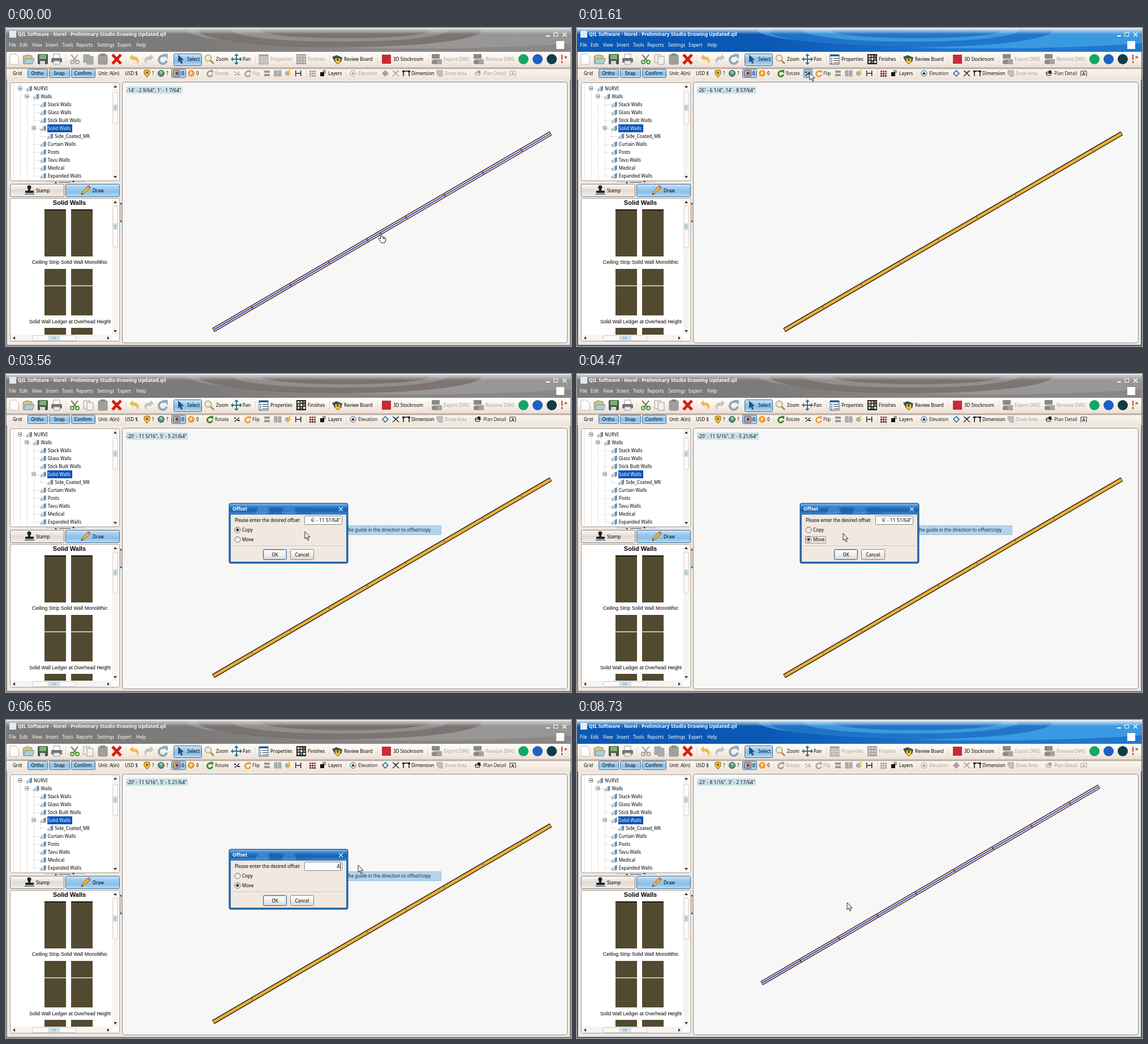
Recreate the animation shown at these times as an HTML page with a canvas. Size 998x561 px, loop 9330 ms.

```html
<!DOCTYPE html>
<html lang="en">
<head>
<meta charset="utf-8">
<title>Offset a wall</title>
<style>
html, body { margin: 0; width: 100%; height: 100%; overflow: hidden; background: #efe6de; }
canvas { display: block; }
</style>
</head>
<body>
<canvas id="stage" width="998" height="561"></canvas>
<script>
const g = document.getElementById('stage').getContext('2d');
const LOOP = 9330, GREY = '#a3a19f', UI = '"Noto Sans", sans-serif', ARIAL = '"Liberation Sans", Arial, sans-serif';

// ---------- drawing helpers ----------
function text(s, x, y, color = '#000', font = '8px ' + UI, align = 'left') {
  g.font = font; g.fillStyle = color; g.textAlign = align;
  g.fillText(s, x, y + 3);
}
function rect(x, y, w, h, fill, stroke, r = 0) {
  g.beginPath();
  g.roundRect(x, y, w, h, r);
  if (fill) { g.fillStyle = fill; g.fill(); }
  if (stroke) { g.strokeStyle = stroke; g.lineWidth = 1; g.stroke(); }
}
function gradient(x0, y0, x1, y1, colors) {
  const f = g.createLinearGradient(x0, y0, x1, y1);
  colors.forEach((c, i) => f.addColorStop(i / (colors.length - 1), c));
  return f;
}
const fade = (y0, y1, ...colors) => gradient(0, y0, 0, y1, colors);
function trace(x, y, pts) {
  g.beginPath();
  for (let i = 0; i < pts.length; i += 2) g.lineTo(x + pts[i], y + pts[i + 1]);
}
function poly(x, y, pts, fill, stroke, w = 1) {
  trace(x, y, pts); g.closePath();
  if (fill) { g.fillStyle = fill; g.fill(); }
  if (stroke) { g.strokeStyle = stroke; g.lineWidth = w; g.stroke(); }
}
function line(x, y, pts, color, w = 1) {
  trace(x, y, pts); g.strokeStyle = color; g.lineWidth = w; g.stroke();
}
function disc(x, y, r, fill, stroke, w = 1) {
  g.beginPath(); g.arc(x, y, r, 0, 7);
  if (fill) { g.fillStyle = fill; g.fill(); }
  if (stroke) { g.strokeStyle = stroke; g.lineWidth = w; g.stroke(); }
}
function turnArrow(x, y, r, color, w) {
  g.beginPath(); g.arc(x, y, r, 0.2, 5.2);
  g.strokeStyle = color; g.lineWidth = w; g.stroke();
  poly(x + r * .5, y - r * .9, [-w, -w, w * 1.3, -w, w * 1.3, w * 1.3], color);
}
function curveArrow(x, y, dir, color) {
  poly(x, y, [-9 * dir, -3, -3 * dir, -9, -3 * dir, -5, 4 * dir, -4, 8 * dir, 2, 5 * dir, 9, 4 * dir, 3, -2 * dir, 0, -2 * dir, 3], color);
}
const triangle = (x, y, dx, dy, s = 3) =>
  poly(x, y, dx ? [dx * s, 0, -dx, -s, -dx, s] : [0, dy * s, -s, -dy, s, -dy], '#333');
const separator = (x, y) => { for (let i = -7; i < 8; i += 3) rect(x, y + i, 1, 1, '#b9aea4'); };

function blueButton(x, y, w, h) {
  rect(x + .5, y + .5, w, h, fade(y, y + h, '#d3e9f9', '#9fcbee', '#8bbfe9', '#b4dcf6'), '#3f6c94', 2);
}

// ---------- motion ----------
const REST = { start: [-170 - 9 / 64, 13 + 7 / 64], toolbar: [-318.25, 176 + 57 / 64],
               side: [-251.3125, 65 + 21 / 64], end: [-284.0625, 38 + 17 / 64] };
// first change, last change, number of steps, waypoints
const MOVES = [
  [510, 1350, 15, [662, 362], [411, 79]],
  [2010, 2430, 8, [411, 79], [530, 277]],
  [3560, 4470, 15, [530, 277], [477, 307], [424, 293], [470, 281]],
  [4530, 5270, 11, [470, 281], [538, 258], [622, 256]],
  [7180, 7730, 9, [622, 256], [477, 322]],
];
const mix = (a, b, p) => a.map((v, i) => v + (b[i] - v) * p);
function progress(t, [t0, t1, n]) {
  if (t < t0) return 0;
  const p = Math.min(1, (Math.floor((t - t0) / (t1 - t0) * (n - 1) + .01) + 1) / n);
  return p * p * (3 - 2 * p);
}
function pointer(t) {
  const m = MOVES.findLast(m => t >= m[0]) || MOVES[0];
  const pts = m.slice(3), at = progress(t, m) * (pts.length - 1);
  const i = Math.min(pts.length - 2, Math.floor(at));
  return mix(pts[i], pts[i + 1], at - i);
}
function feet(v) {
  const n = Math.round(Math.abs(v) * 64), inches = Math.floor(n / 64);
  let a = n % 64, b = 64;
  while (a && a % 2 === 0) { a /= 2; b /= 2; }
  return `${v < 0 ? '-' : ''}${Math.floor(inches / 12)}' - ${inches % 12}${a ? ` ${a}/${b}` : ''}"`;
}
function position(t) {
  if (t >= 8730) return REST.end;
  return t < 2010 ? mix(REST.start, REST.toolbar, progress(t, MOVES[0]))
                  : mix(REST.toolbar, REST.side, progress(t, MOVES[1]));
}

// ---------- window ----------
function titleBar(active) {
  const [pale, left, right, glow, lens] = active
    ? ['#d5e6f4', '#0b58b4', '#1f78cd', '#4fb0ee', '#0f5fbb']
    : ['#d2d2d2', '#7d7b7a', '#8a8887', '#a3a1a0', '#69605d'];
  rect(0, 1, 998, 560, active ? '#1a66b6' : '#848281');
  rect(0, 1, 998, 42, gradient(0, 0, 998, 0, [left, left, right, right]));
  g.save();
  g.beginPath(); g.rect(0, 1, 998, 42); g.clip();
  g.globalAlpha = .6;
  const swirl = (x, y, rx, ry, color) => {
    g.beginPath(); g.ellipse(x, y, rx, ry, 0, 0, 7); g.fillStyle = color; g.fill();
  };
  swirl(720, 4, 400, 32, glow);
  swirl(590, 4, 250, 30, lens);
  swirl(590, 4, 190, 20, glow);
  swirl(600, 4, 150, 14, lens);
  g.restore();
  rect(0, 1, 998, 10, fade(1, 11, pale, pale + '80', pale + '00'));
  rect(6, 5, 12, 12, '#dfeaf2');
  text('QIL Software - Norel - Preliminary Studio Drawing Updated.qil', 21, 11, '#fff', 'bold 8.5px ' + UI);
  line(954, 14, [0, 0, 7, 0], '#fff', 2);
  rect(967.5, 8.5, 7, 6, null, '#fff');
  line(983, 8, [0, 0, 7, 7], '#fff', 1.5); line(983, 15, [0, 0, 7, -7], '#fff', 1.5);
  [['File', 5], ['Edit', 24], ['View', 46], ['Insert', 70], ['Tools', 99], ['Reports', 124],
   ['Settings', 161], ['Expert', 197], ['Help', 230]].forEach(([s, x]) => text(s, x, 30, '#fff'));
  rect(972, 23, 14, 14, '#fff');
}

function mainToolbar(on) {
  const tint = c => on ? c : GREY;
  rect(1, 42, 996, 28, fade(42, 70, '#fffdfa', '#f8f0e8', '#eaded4'));
  rect(1, 69, 996, 4, fade(69, 73, '#e4d9cf', '#a79a90', '#f6efe8'));
  poly(7, 46, [0, 0, 10, 0, 15, 5, 15, 18, 0, 18], '#fff', '#bbb');
  poly(30, 47, [0, 3, 7, 0, 16, 2, 17, 16, 1, 16], '#d9c27a', '#7d8a8c');
  poly(31, 54, [3, 0, 19, 0, 16, 9, 0, 9], '#a9d0d8', '#6f9398');
  rect(56, 46, 18, 18, '#4d5551', null, 2); rect(59, 47, 12, 8, '#79b56b'); rect(60, 58, 9, 6, '#d7d7d7');
  rect(84, 46, 11, 8, '#fff', '#999'); rect(80, 53, 19, 8, '#6d7378', null, 2); rect(84, 58, 11, 6, '#eee', '#999');
  separator(105, 55);
  const cut = tint('#3f9b35');
  line(115, 47, [0, 0, 10, 12], tint('#777'), 2); line(127, 47, [0, 0, -9, 12], tint('#777'), 2);
  disc(117, 60, 3, null, cut, 2); disc(126, 60, 3, null, cut, 2);
  for (const d of [0, 6]) rect(137 + d, 47 + d / 2, 11, 14, on ? '#f1f1ee' : '#aaa', '#999');
  rect(163, 47, 16, 17, '#a19f9b', '#8c8a87', 2); rect(167, 45, 8, 4, '#8a8885');
  line(188, 47, [0, 0, 15, 16], '#d81e12', 5); line(188, 63, [0, 0, 15, -16], '#d81e12', 5);
  separator(211, 55);
  curveArrow(227, 55, 1, '#eebb4d'); curveArrow(252, 55, -1, '#c3c3c3');
  turnArrow(277, 56, 7, '#8ba9bd', 4);
  blueButton(296, 45, 49, 21);
  poly(304, 47, [0, 0, 10, 9, 6, 10, 8, 15, 5, 16, 3, 11, 0, 14], '#24527e');
  text('Select', 320, 55);
  line(361, 57, [0, 0, 6, 6], '#b98937', 3); disc(357, 53, 5.5, '#dff0f8', '#cbb06a', 2);
  text('Zoom', 371, 55);
  line(407, 47, [0, 0, 0, 17], '#31708e', 2); line(399, 55, [0, 0, 17, 0], '#31708e', 2);
  for (const [x, y] of [[0, -1], [0, 1], [-1, 0], [1, 0]])
    poly(407 + x * 6, 55 + y * 6, [x * 4, y * 4, y * 4, x * 4, -y * 4, -x * 4], '#31708e');
  text('Pan', 418, 55);
  separator(440, 55);
  rect(447, 47, 16, 17, on ? '#fff' : '#d0cecc', tint('#245b90'));
  rect(447, 47, 16, 3, tint('#245b90'));
  for (const y of [53, 57, 61]) { rect(449, y, 2, 2, tint('#245b90')); rect(453, y, 9, 1, tint('#333')); }
  text('Properties', 467, 55, tint('#000'));
  rect(513, 46, 17, 18, tint('#222'));
  ['#fff', '#e3b440', '#d94d40', '#8fbce0', '#fff', '#5faa62', '#e9e2b8', '#6b81bf', '#fff'].forEach((c, i) =>
    rect(515 + i % 3 * 5, 48 + Math.floor(i / 3) * 5, 3.5, 3.5, on ? c : '#d0cecc'));
  text('Finishes', 533, 55, tint('#000'));
  separator(571, 55);
  poly(576, 48, [0, 3, 8, 0, 18, 4, 16, 12, 5, 12], '#34515b');
  poly(581, 53, [0, 0, 10, 0, 10, 6, 5, 11, 0, 6], '#f0c53a', '#5b4b14'); disc(586, 56, 2, '#34515b');
  text('Review Board', 597, 55);
  separator(656, 55);
  rect(664, 47, 16, 16, '#c92b35');
  text('3D Stockroom', 684, 55);
  separator(745, 55);
  for (const [x, s] of [[752, 'Export DWG'], [826, 'Remove DWG']]) {
    rect(x, 46, 14, 8, '#8b8987'); rect(x + 2, 55, 16, 9, '#a5a3a1'); rect(x, 57, 9, 6, '#8b8987');
    text(s, x + 21, 55, GREY);
  }
  disc(914, 55, 9, '#12a765'); disc(939, 55, 9, '#1f5fc4'); disc(964, 55, 9, '#123c46');
  rect(981, 47, 2, 9, '#d5382c'); rect(981, 58, 2, 4, '#d5382c');
  text('»', 986, 51, '#7a2a20', 'bold 9px ' + UI);
}

function drawToolbar(on, hover) {
  const tint = c => on ? c : GREY, ink = tint('#222');
  rect(1, 73, 996, 18, fade(73, 91, '#fbf5ef', '#eee3d9'));
  text('Grid', 12, 80);
  [['Ortho', 38, 35], ['Snap', 76, 36], ['Confirm', 115, 42]].forEach(([s, x, w]) => {
    blueButton(x, 72, w, 15); text(s, x + w / 2, 80, '#000', undefined, 'center');
  });
  text('Unit: A(in)', 163, 80); text('USD $', 210, 80);
  poly(244, 74, [0, 1, 5, 0, 10, 1, 10, 7, 5, 13, 0, 7], '#f3bd2c', '#80602a');
  disc(249, 79, 2, '#80602a');
  text('?', 258, 80);
  separator(266, 80);
  disc(274, 80, 5.5, '#4a8f92', '#355'); poly(274, 77, [-3, 0, 1, -2, 3, 2, 0, 5], '#a5cf69');
  text('?', 283, 80);
  blueButton(292, 72, 25, 15);
  rect(296, 75, 11, 10, '#f2c83c', '#3a2e88'); disc(302, 80, 3, '#6144a0');
  text('0', 310, 80);
  disc(327, 80, 6, '#f0992b'); text('P', 327, 80, '#fff', 'bold 8px ' + UI, 'center'); text('0', 336, 80);
  separator(347, 80);
  turnArrow(360, 81, 4.5, tint('#3b8b2c'), 3); text('Rotate', 369, 80, ink);
  if (hover) rect(400.5, 72.5, 15, 15, hover > 1 ? '#98c7ea' : '#cfe6f6', '#4e7da5', 2);
  line(404, 84, [0, 0, 8, -7], ink, 1.5); rect(403, 77, 3, 2, ink); rect(409, 81, 4, 2, ink);
  turnArrow(427, 81, 4.5, tint('#e6962a'), 2.5); text('Flip', 435, 80, ink);
  rect(456, 75, 10, 4, '#9b9997'); rect(456, 81, 10, 4, '#9b9997');
  rect(474, 75, 5, 10, '#b1afad', '#9b9997'); rect(481, 75, 5, 10, '#b1afad', '#9b9997');
  disc(497, 80, 4, '#8cb6cc'); poly(496, 74, [4, 0, 0, 7, 3, 7, 1, 13, 8, 5, 4, 5, 7, 0], '#f0b62f');
  rect(511, 75, 1.5, 10, '#222'); rect(520, 75, 1.5, 10, '#222'); line(513, 80, [0, 0, 7, 0], '#222', 1.5);
  separator(530, 80);
  for (let i = 0; i < 9; i++)
    rect(536 + i % 3 * 4, 75 + Math.floor(i / 3) * 4, 3, 3, i < 3 || i === 5 ? tint('#c23b31') : tint('#444'));
  rect(559, 74, 6, 6, '#999'); rect(555, 78, 7, 7, '#111');
  text('Layers', 569, 80);
  separator(600, 80);
  disc(613, 80, 5, on ? '#eef5fa' : null, tint('#245b90')); poly(613, 80, [0, -3, 3, 2, -3, 2], ink);
  text('Elevation', 622, 80, ink);
  poly(670, 80, [0, -5, 5, 0, 0, 5, -5, 0], on ? '#e6f2fa' : GREY, tint('#245b90'), 1.5);
  line(683, 75, [0, 0, 11, 10], ink, 1.3); line(683, 85, [0, 0, 11, -10], ink, 1.3);
  line(683, 75, [0, 0, 5, 3, 11, 0], tint('#245b90'));
  line(702, 85, [0, 0, 0, -9, 10, -9, 10, 0], '#111', 1.5); rect(700, 75, 4, 3, '#111'); rect(710, 75, 4, 3, '#111');
  text('Dimension', 716, 80);
  poly(761, 75, [0, 0, 10, 0, 10, 10, 4, 10, 0, 5], '#c2c0be', GREY); text('Draw Area', 775, 80, GREY);
  rect(829.5, 77.5, 7, 6, null, ink); line(827, 80, [0, 0, 13, 0], ink); rect(833, 75, 5, 5, ink);
  text('Plan Detail', 843, 80, ink);
  line(890, 85, [0, 0, 0, -9, 10, -9, 10, 0], ink); text('A', 895, 81, ink, 'bold 8px ' + UI, 'center');
}

function scrollBar(x, top, bottom, thumbY, thumbH) {
  rect(x, top, 10, bottom - top, '#f6f3f0');
  triangle(x + 5, top + 7, 0, -1); triangle(x + 5, bottom - 7, 0, 1);
  rect(x + .5, thumbY + .5, 9, thumbH, '#fbf9f7', '#d3ccc6', 2);
  rect(x + 1, thumbY + thumbH / 2 - 6, 8, 12, '#d0e3ef', null, 2);
  for (let i = -3; i < 4; i += 2) rect(x + 3, thumbY + thumbH / 2 + i, 4, 1, '#8eacc0');
}

function treePanel() {
  rect(7.5, 96.5, 193, 173, '#fff', '#a39b95', 2);
  g.setLineDash([1, 2]);
  [[13, 98, 268], [25, 98, 268], [37, 111, 268], [49, 125, 261], [61, 181, 191]].forEach(([x, a, b]) =>
    line(x + .5, 0, [0, a, 0, b], '#aaa'));
  const rows = [['NURVI', 0, 1], ['Walls', 1, 1], ['Stack Walls', 2], ['Glass Walls', 2], ['Stick Built Walls', 2],
    ['Solid Walls', 2, 1], ['Side_Coated_MK', 3], ['Curtain Walls', 2], ['Posts', 2], ['Tavu Walls', 2],
    ['Medical', 2], ['Expanded Walls', 2]];
  rows.forEach(([s, depth], i) => line(25 + depth * 12, 107.5 + i * 14, [0, 0, 10, 0], '#aaa'));
  g.setLineDash([]);
  rows.forEach(([s, depth, open], i) => {
    const x = 49 + depth * 12.4, y = 107 + i * 14, picked = i === 5;
    if (open) {
      rect(21.5 + depth * 12.3, y - 3.5, 6, 6, '#fff', '#888');
      line(23 + depth * 12.3, y - .5, [0, 0, 4, 0], '#222');
    }
    poly(x - 13, y - 5, [0, 6, 3, 4, 3, 9, 0, 10], '#a9b3ba');
    poly(x - 10, y - 5, [0, 3, 3, 1, 3, 10, 0, 10], '#cdd4d8');
    poly(x - 7, y - 5, [0, 1, 4, 0, 4, 8, 0, 10], '#6f8fa8');
    if (picked) rect(73, 170, 44, 14, '#0a54b8');
    text(s, x, y, picked ? '#fff' : '#000');
  });
  scrollBar(188, 97, 269, 113, 55);
  rect(70, 271, 70, 1, '#bcb1a8'); triangle(88, 273, 0, -1, 2); triangle(119, 271, 0, 1, 2); rect(94, 272, 20, 1, '#666');
}

function libraryPanel() {
  rect(7.5, 275.5, 95, 22, fade(275, 298, '#fdfcfb', '#e2dbd5', '#f4efeb'), '#877f79', 2);
  disc(41, 281, 3.5, '#222'); rect(39, 282, 4, 6, '#222'); rect(34, 287, 15, 4, '#222', null, 1); rect(33, 292, 17, 2, '#57839f');
  text('Stamp', 53, 287);
  blueButton(105, 275, 95, 22);
  poly(133, 279, [0, 15, 2, 10, 11, 0, 15, 4, 5, 13], '#edb13b', '#94631c');
  poly(144, 279, [0, 0, 4, 4, 6, 2, 2, -2], '#d9695a'); poly(133, 279, [0, 15, 1, 12, 3, 14], '#222');
  text('Draw', 153, 287);

  rect(7.5, 300.5, 193, 252, '#fff', '#a39b95', 2);
  text('Solid Walls', 112, 309, '#000', 'bold 11px ' + ARIAL, 'center');
  for (const x of [68, 115]) {
    rect(x, 320, 38, 83, '#524a30'); rect(x, 320, 38, 1.5, '#000');
    rect(x, 425, 38, 82, '#524a30'); rect(x, 454, 38, 1.5, '#e8e6e0');
    rect(x, 529, 38, 12, '#524a30');
  }
  text('Ceiling Strip Solid Wall Monolithic', 112.5, 413, '#000', '9px ' + ARIAL, 'center');
  text('Solid Wall Ledger at Overhead Height', 113, 518, '#000', '8.6px ' + ARIAL, 'center');
  scrollBar(188, 301, 541, 314, 72);
  rect(8, 541, 180, 11, '#f6f3f0');
  triangle(15, 547, -1, 0); triangle(180, 547, 1, 0);
  rect(46.5, 542.5, 77, 9, '#fbf9f7', '#d3ccc6', 2); rect(74, 543, 22, 8, '#d0e3ef', null, 2);
  for (let i = 0; i < 4; i++) rect(81 + i * 2, 545, 1, 4, '#8eacc0');
  rect(202, 308, 2, 35, '#c3b8af'); triangle(203, 310, -1, 0, 2); triangle(203, 341, 1, 0, 2);
}

// ---------- drawing area ----------
function wall(moved, selected) {
  g.save();
  g.translate(moved ? 326 : 366, moved ? 464.5 : 533);
  g.rotate(Math.atan2(-347, 596));
  const length = 690;
  rect(0, -4, length, 8, selected ? '#432b20' : '#54391c');
  rect(1, -2.4, length - 2, 4.8, selected ? '#e9b236' : '#f5f3ee');
  if (!selected) rect(1, -.8, length - 2, 1.6, '#2222dd');
  for (let i = 1; i < 9; i++) rect(i * 78.7, -3, 1.5, selected ? 4 : 6, selected ? '#8a5f26' : '#54391c');
  g.restore();
}
function tooltip(x, y) {
  rect(x + 1.5, y - 9.5, 237, 16, '#b3d4ec', '#9cc2dd');
  text('Click the side of the guide in the direction to offset/copy', x + 11, y - 2, '#1c2a36');
}

function dialog(t) {
  const moveChosen = t >= 4080, small = '8.5px ' + UI;
  rect(394, 228, 210, 106, '#2a6cb0', '#1b4f8c', 3);
  rect(395, 229, 208, 18, fade(229, 247, '#7db8ea', '#2a78c6', '#1760b0', '#3b8ad2'), null, 2);
  [[440, '#5d9fdb'], [462, '#1c5ca8'], [486, '#4f97d8'], [512, '#1f62ae']].forEach(([x, c]) => {
    g.globalAlpha = .5; poly(x, 235, [6, 0, 22, 0, 28, 12, 0, 12], c); g.globalAlpha = 1;
  });
  text('Offset', 400, 238, '#fff', 'bold 8.5px ' + UI);
  line(588, 235, [0, 0, 7, 7], '#dcecf9', 1.3); line(588, 242, [0, 0, 7, -7], '#dcecf9', 1.3);
  rect(397, 248, 204, 83, '#f1e8e0');
  text('Please enter the desired offset', 404, 258);
  rect(527.5, 250.5, 66, 15, '#fff', '#7d8790', 1);

  const selecting = t >= 4900 && t < 6060;
  if (selecting) {
    const right = Math.min(591, pointer(t)[0]);
    if (right > 539) rect(539, 252, right - 539, 12, '#0a54b8');
  }
  if (t < 6060) text('6\' - 11 51/64"', 591, 258, selecting ? '#fff' : '#000', small, 'right');
  else if (t >= 6650) text('4', 589, 258, '#000', small, 'right');
  if (t >= 6190 || (t >= 5270 && t < 5600)) rect(590, 252, 1, 11, '#000');

  [['Copy', 275, !moveChosen], ['Move', 292, moveChosen]].forEach(([s, y, chosen]) => {
    disc(409, y, 5, fade(y - 5, y + 5, '#dcd8d4', '#fff'), '#6f6b68');
    if (chosen) disc(409, y, 2.5, '#333');
    text(s, 417, y);
  });
  if (moveChosen && t < 4900) {
    g.setLineDash([1, 1]); rect(403.5, 286.5, 36, 12, null, '#444'); g.setLineDash([]);
  }
  rect(400, 303, 198, 1, '#c4bab2'); rect(400, 304, 198, 1, '#fff');
  [['OK', 454], ['Cancel', 502]].forEach(([s, x], i) => {
    const hot = !i && t >= 7670, down = hot && t >= 7990;
    const face = down ? ['#8bbfe9', '#b4dcf6'] : hot ? ['#e6f3fc', '#b3d7f1'] : ['#fff', '#f3eeea', '#ddd5ce'];
    rect(x + .5, 309.5, 41, 18, fade(309, 328, ...face), i ? '#8a7f78' : '#3f6c94', 2);
    if (!i) rect(455.5, 310.5, 39, 16, null, '#a9cbe6', 1);
    text(s, x + 21, 319, '#000', undefined, 'center');
  });
}

const CURSORS = {
  arrow: (x, y) => poly(x, y, [0, 0, 0, 12.5, 3, 10, 5, 15, 7, 14, 5, 9.5, 9, 9.3], '#fff', '#222'),
  cross: (x, y) => { rect(x - 10, y, 20, 1.6, '#000'); rect(x - .8, y - 9, 1.6, 19, '#000'); },
  hand: (x, y) => {
    poly(x, y, [-1, 0, 1, 0, 2, 6, 8, 8, 9, 11, 7, 17, 1, 17, -4, 10, -3, 8, 0, 10], '#fff', '#222');
    line(x, y, [4, 7, 4, 10], '#222'); line(x, y, [6, 8, 6, 11], '#222');
  },
};
function cursorKind(t, y) {
  if (t < 570) return 'hand';
  const picking = t >= 2010 && t < 2830 && y > 96;
  return picking || (t >= 8110 && t < 8730) ? 'cross' : 'arrow';
}

function render(t) {
  const [x, y] = pointer(t);
  const active = (t >= 60 && t < 2830) || t >= 8290;
  const selected = t >= 190 && t < 8670;
  g.clearRect(0, 0, 998, 561);
  rect(0, 0, 998, 1, '#fff');
  titleBar(active);
  rect(2, 72, 994, 487, '#f0e7df');
  mainToolbar(selected);
  drawToolbar(selected, t >= 1480 && t < 2010 ? (t >= 1610 ? 2 : 1) : 0);
  treePanel();
  libraryPanel();
  rect(205.5, 95.5, 786, 460, '#f7f7f7', '#8f8882', 4);
  const label = position(t).map(feet).join(', ');
  g.font = '8.5px ' + UI;
  rect(212, 103, g.measureText(label).width + 3, 13, '#cde3ec');
  text(label, 213, 110, '#111', '8.5px ' + UI);
  wall(t >= 8610, selected);
  if (t >= 2010 && t < 8550 && y > 96) tooltip(...(t < 2430 ? [x, y] : [530, 277]));
  if (t >= 2830 && t < 8110) dialog(t);
  CURSORS[cursorKind(t, y)](x, y);
}

function frame(now) {
  render(now % LOOP);
  requestAnimationFrame(frame);
}
requestAnimationFrame(frame);
</script>
</body>
</html>
```
